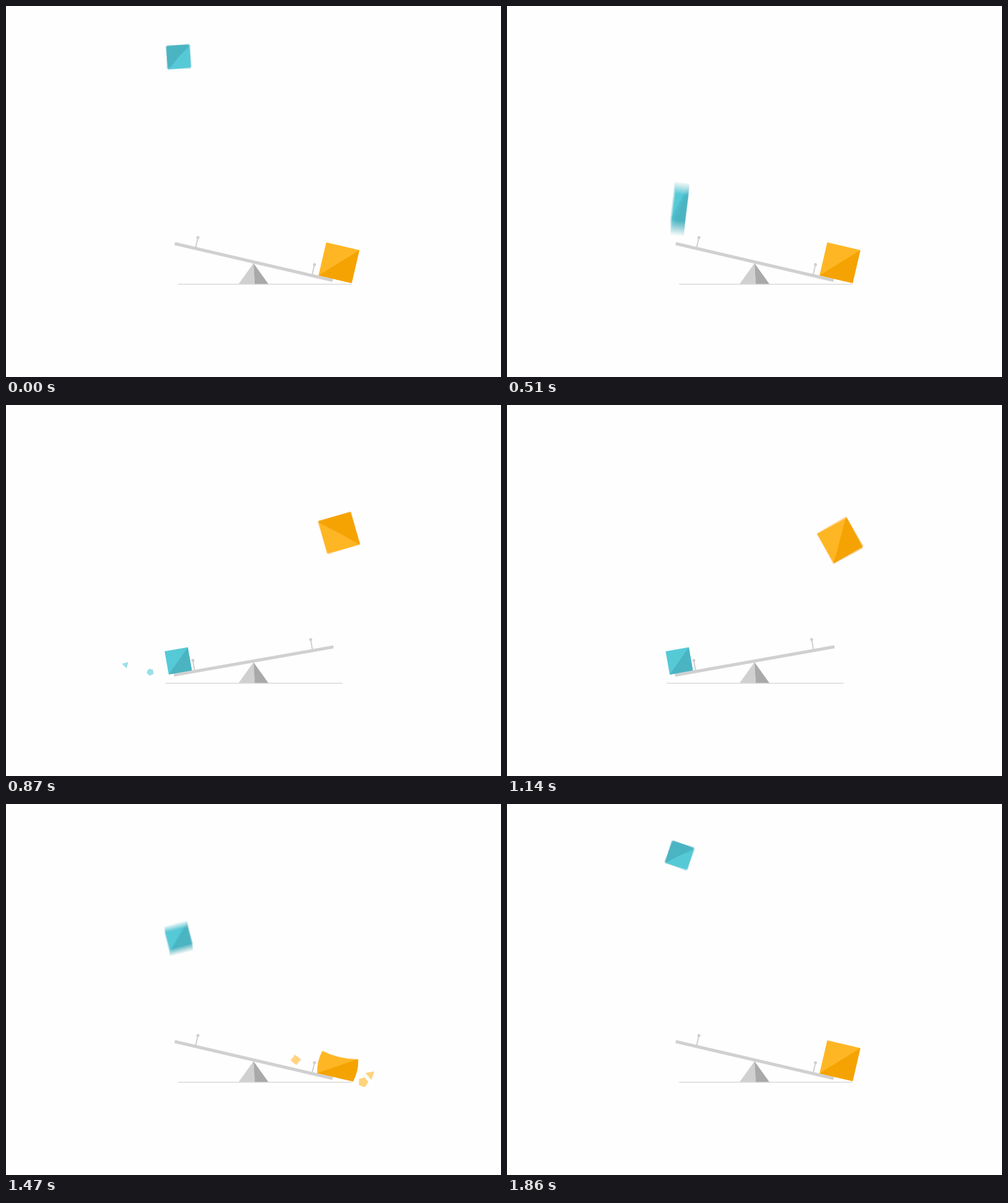
An HTML page with a canvas for the animation above (1.89 s loop, 800 by 600 pixels).

```html
<!DOCTYPE html>
<html lang="en">
<head>
<meta charset="utf-8">
<title>Seesaw</title>
<style>
  html, body { margin: 0; width: 100%; height: 100%; overflow: hidden; background: #fefefe; }
  canvas { display: block; width: 800px; height: 600px; }
</style>
</head>
<body>
<canvas id="stage" width="800" height="600"></canvas>
<script>
const LOOP = 1890, STEP = 30, SHUTTER = 15, SAMPLES = 24;
const BLUE_HIT = 533, ORANGE_HIT = 1342, IMPACT = 16;
const BEAM_UP = -10.1, BEAM_DOWN = 13.1;
const RAD = Math.PI / 180;

const out = document.getElementById('stage').getContext('2d');
const layer = document.createElement('canvas');
layer.width = 800;
layer.height = 600;
const ctx = layer.getContext('2d');

const lerp = (a, b, p) => a + (b - a) * p;
const clamp = p => Math.min(1, Math.max(0, p));
const decay = (t, tau) => Math.exp(-t / tau);
const mod = t => ((t % LOOP) + LOOP) % LOOP;

// Each cube is thrown when the other one hits, and lands just after its own hit.
const blue = {
  size: 38, light: '#56c9d7', dark: '#4bb4c2',
  launch: ORANGE_HIT, air: BLUE_HIT + LOOP + IMPACT - ORANGE_HIT, seat: -120,
  x: 279, top: 82, apex: 608, rise: 268, risePower: 2.9, fall: 310, fallPower: 2.85,
  kick: 52, kickTime: 6, lean: 0,
  spin(t) {
    const p = clamp((t - 5) / 1083), n = 2.4;
    return lerp(-12, -353, p ** n / (p ** n + (1 - p) ** n));
  }
};

const orange = {
  size: 55, light: '#ffb624', dark: '#f5a302',
  launch: BLUE_HIT, air: ORANGE_HIT + IMPACT - BLUE_HIT, seat: 134.5,
  x: 538.2, top: 206, apex: 387, rise: 106, risePower: 2.4, fall: 202, fallPower: 4,
  kick: 103, kickTime: 20, lean: 18,
  spin(t) {
    return 360 - 246 * (1 - t / this.air) ** 1.6 - 101 * decay(t, 20);
  }
};

const chip = (cube, hit, sides, from, to, turn) =>
  ({ color: cube.light, born: hit + 20, sides, from, to, turn });

const chips = [
  chip(blue, BLUE_HIT, 3, [256, 427], [193, 420], 75),
  chip(blue, BLUE_HIT, 5, [258, 428], [233, 432], -115),
  chip(orange, ORANGE_HIT, 3, [560, 440], [600, 437], 184),
  chip(orange, ORANGE_HIT, 5, [560, 447], [584, 451], -88),
  chip(orange, ORANGE_HIT, 4, [505, 430], [454, 407.5], 67)
];

function beamAngle(t) {
  const s = mod(t - BLUE_HIT), turn = ORANGE_HIT - BLUE_HIT;
  return s < turn
    ? lerp(BEAM_UP, BEAM_DOWN, decay(s, 56))
    : lerp(BEAM_DOWN, BEAM_UP, decay(s - turn, 4));
}

function fillPath(color, points) {
  ctx.fillStyle = color;
  ctx.beginPath();
  for (const p of points) ctx.lineTo(p[0], p[1]);
  ctx.fill();
}

function enterBeam(angle) {
  ctx.translate(400.3, 414);
  ctx.rotate(angle * RAD);
}

function drawGround(angle) {
  const k = (angle - BEAM_UP) / (BEAM_DOWN - BEAM_UP);
  const left = lerp(258, 278.3, k), right = lerp(544, 558.5, k);
  ctx.fillStyle = '#e2e2e2';
  ctx.fillRect(left, 449, right - left, 2);
}

function drawBeam(angle) {
  ctx.save();
  enterBeam(angle);
  ctx.fillStyle = '#d0d0d0';
  ctx.fillRect(-131, -2.5, 262, 5);
  for (const x of [-96.7, 96.7]) {
    ctx.fillRect(x - 1, -18, 2, 17);
    ctx.beginPath();
    ctx.arc(x, -18, 2.5, 0, 7);
    ctx.fill();
  }
  ctx.restore();
}

function drawStand() {
  fillPath('#d0d0d0', [[400, 416], [376, 449.5], [402, 449.5]]);
  fillPath('#a9a9a9', [[400, 416], [402, 449.5], [424, 449.5]]);
}

// A cube standing on the origin; squashed sides bend, a stretched cube gets thin.
function drawBody(cube, stretch) {
  const squash = Math.max(0, 1 - stretch);
  const w = cube.size / 2 * (stretch > 1 ? 1 / stretch : 1 + squash * .25);
  const h = cube.size * stretch, bend = squash * cube.size * .38;
  const side = w + bend * .7;
  ctx.fillStyle = cube.light;
  ctx.beginPath();
  ctx.moveTo(-w, 0);
  ctx.quadraticCurveTo(-side, -h / 2, -w, -h);
  ctx.quadraticCurveTo(0, bend - h, w, -h);
  ctx.quadraticCurveTo(side, -h / 2, w, 0);
  ctx.fill();
  ctx.fillStyle = cube.dark;
  ctx.beginPath();
  ctx.moveTo(-w, 0);
  ctx.lineTo(w, -h);
  ctx.quadraticCurveTo(side, -h / 2, w, 0);
  ctx.fill();
}

function flyCube(cube, t) {
  const down = clamp((t - cube.apex) / (cube.air - cube.apex));
  const up = clamp(1 - t / cube.apex);
  const y = cube.top + cube.rise * up ** cube.risePower
    + cube.fall * down ** cube.fallPower + cube.kick * decay(t, cube.kickTime);
  const lean = cube.lean * clamp((t - cube.air) / IMPACT + 1);
  const stretch = 1 + 1.3 * down ** 8;
  ctx.translate(cube.x - lean / 2, y);
  ctx.rotate((cube.spin(t) + lean) * RAD);
  ctx.translate(0, cube.size * stretch / 2);
  drawBody(cube, stretch);
}

function seatCube(cube, t, angle) {
  const p = clamp(t / 320);
  enterBeam(angle);
  ctx.translate(cube.seat, -2.5);
  drawBody(cube, 1 - .46 * (1 - p) ** 2 * (1 + 2 * p));
}

function drawCube(cube, time, angle) {
  const t = mod(time - cube.launch);
  ctx.save();
  if (t < cube.air) flyCube(cube, t);
  else seatCube(cube, t - cube.air, angle);
  ctx.restore();
}

function drawChip(c, time) {
  const u = mod(time - c.born) / 480;
  if (u >= 1) return;
  const e = 1 - (1 - u) ** 5, r = 8.3 * (1 - u ** 3);
  const x = lerp(c.from[0], c.to[0], e), y = lerp(c.from[1], c.to[1], e);
  const points = [];
  for (let i = 0; i < c.sides; i++) {
    const a = c.turn * RAD + 1 - e + i * 2 * Math.PI / c.sides;
    points.push([x + r * Math.cos(a), y + r * Math.sin(a)]);
  }
  ctx.globalAlpha = .6;
  fillPath(c.color, points);
  ctx.globalAlpha = 1;
}

function drawScene(time) {
  const angle = beamAngle(time);
  ctx.fillStyle = '#fefefe';
  ctx.fillRect(0, 0, 800, 600);
  drawGround(angle);
  drawBeam(angle);
  drawStand();
  for (const c of chips) drawChip(c, time);
  drawCube(blue, time, angle);
  drawCube(orange, time, angle);
}

// Motion blur: a running average of the scene over the shutter time.
function render(time) {
  for (let i = 0; i < SAMPLES; i++) {
    drawScene(time + ((i + .5) / SAMPLES - .5) * SHUTTER);
    out.globalAlpha = 1 / (i + 1);
    out.drawImage(layer, 0, 0);
  }
}

const begin = performance.now();
let shown = -1;
function tick() {
  const time = Math.floor(mod(performance.now() - begin) / STEP) * STEP;
  if (time !== shown) {
    shown = time;
    render(time);
  }
  requestAnimationFrame(tick);
}
tick();
</script>
</body>
</html>
```
